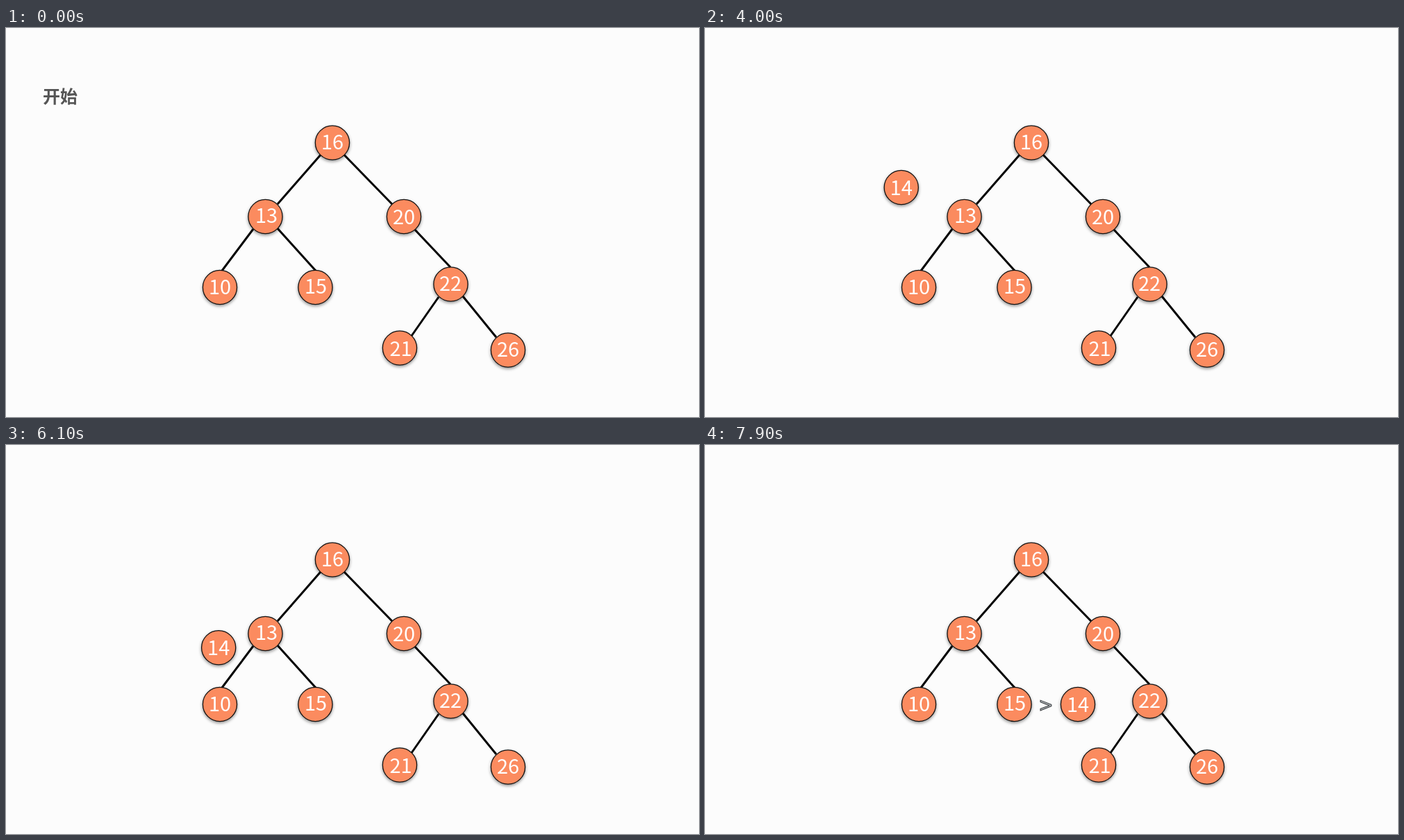
These frames come from a looping animation (998 by 561 pixels, 8 s). An HTML page:

```html
<!DOCTYPE html>
<html lang="zh">
<head>
<meta charset="utf-8">
<title>二叉树插入</title>
<style>
  html, body { margin: 0; width: 100%; height: 100%; overflow: hidden; background: #fcfcfc; }
  svg { display: block; width: 998px; height: 561px; }
  text { font-family: "Noto Sans CJK SC", "Noto Sans CJK", "Noto Sans CJK JP", sans-serif; }
  line { stroke: #000; stroke-width: 3; }
  circle { fill: #fb8b5f; stroke: #111; stroke-width: 1.3; filter: drop-shadow(0 2.5px 2px rgba(0, 0, 0, .42)); }
  .key { fill: #fff; font-size: 29px; text-anchor: middle; }
  .sign { fill: #aeb2b5; stroke: #34383b; stroke-width: 1; font-size: 33px; text-anchor: middle; }
  .title { fill: #555; font-size: 25px; font-weight: 700; }
</style>
</head>
<body>
<svg id="stage" viewBox="0 0 998 561"></svg>
<script>
const LOOP = 8000, STEP = 100;
const stage = document.getElementById('stage');

function add(parent, tag, attrs, text = '') {
  const el = document.createElementNS('http://www.w3.org/2000/svg', tag);
  for (const name in attrs) el.setAttribute(name, attrs[name]);
  el.textContent = text;
  return parent.appendChild(el);
}

// Labels sit slightly off-centre in some nodes (dx, dy).
function addNode(key, x, y, dx = 0, dy = 0) {
  const node = add(stage, 'g', { transform: `translate(${x} ${y})` });
  add(node, 'circle', { r: 24.6 });
  add(node, 'text', { class: 'key', x: dx, y: dy + 10.6 }, key);
  return node;
}

const addSign = (sign, x, y) => add(stage, 'text', { class: 'sign', x, y: y + 12 }, sign);

const edges = [
  [453, 183, 391, 254], [487, 183, 556, 254],
  [356, 290, 311, 350], [391, 289, 446, 350], [589, 291, 640, 345],
  [623, 388, 584, 444], [658, 387, 706, 446]
];
for (const [x1, y1, x2, y2] of edges) add(stage, 'line', { x1, y1, x2, y2 });

addNode(16, 470, 165.5, 0, -1);
addNode(13, 373.5, 272, 1.5, -1.5);
addNode(20, 573, 272);
addNode(10, 308, 374, 0, -.5);
addNode(15, 445.5, 374, .5, -1.5);
addNode(22, 640.5, 369.5, -.5, -1.5);
addNode(21, 567, 461.5, 1.5, .5);
addNode(26, 723, 464.5, 0, -1.5);

const title = add(stage, 'text', { class: 'title', x: 53, y: 107.5 }, '开始');
const signs = [
  { el: addSign('<', 401, 166), start: 2500, duration: 500, end: 3700 },
  { el: addSign('>', 311.5, 270.5), start: 4900, duration: 500, end: 6000 },
  { el: addSign('>', 491, 375.5), start: 7300, duration: 600, end: LOOP }
];
const inserted = addNode(14, 334, 166);

const progress = (t, start, duration) => Math.min(1, Math.max(0, (t - start) / duration));
const easeOut = u => 1 - (1 - u) ** 1.88;
const mix = (a, b, u) => a + (b - a) * u;

function render(t) {
  title.setAttribute('opacity', 1 - progress(t, 900, 300));
  if (t < 1000) title.setAttribute('opacity', 1);
  inserted.setAttribute('opacity', progress(t, 1300, 650));

  const first = easeOut(progress(t, 3650, 900));
  const second = easeOut(progress(t, 6000, 900));
  const x = mix(mix(334, 249, first), 537, second);
  const y = mix(mix(166, 272, first), 374, second);
  inserted.setAttribute('transform', `translate(${x} ${y})`);

  for (const { el, start, duration, end } of signs)
    el.setAttribute('opacity', t < end ? progress(t, start, duration) : 0);
}

const origin = performance.now();
function tick() {
  const t = (performance.now() - origin) % LOOP;
  render(Math.floor(t / STEP) * STEP);
  requestAnimationFrame(tick);
}
tick();
</script>
</body>
</html>
```
